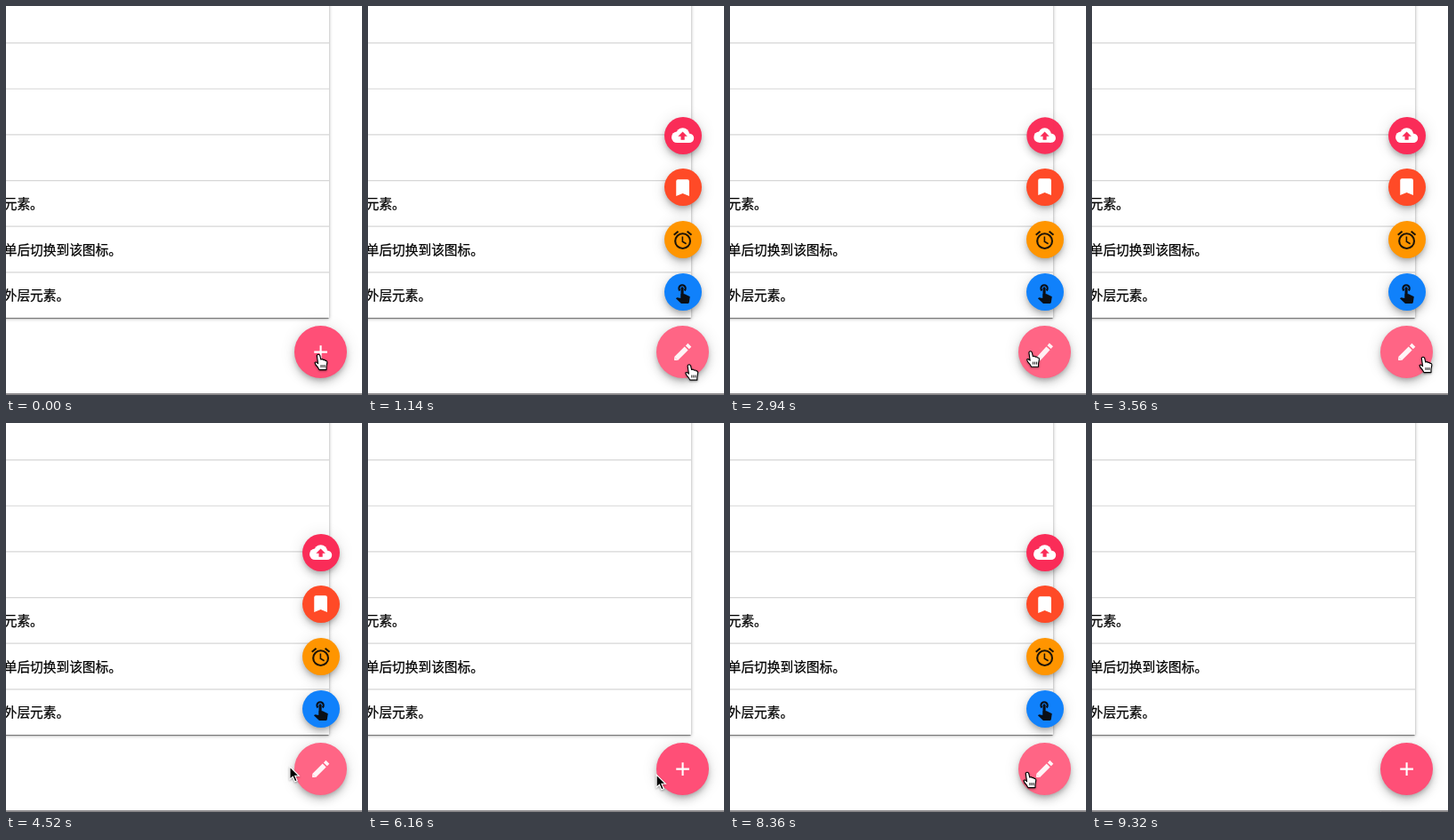
An HTML page that plays this animation: 400 px wide and 438 px high, repeating every 9340 ms.

```html
<!DOCTYPE html>
<html lang="zh-CN">
<head>
<meta charset="utf-8">
<style>
html, body { margin: 0; width: 100%; height: 100%; overflow: hidden; background: #fff; }
#stage { position: relative; width: 400px; height: 438px; overflow: hidden; background: #fff; }
#stage > * { position: absolute; }
#panel {
  left: -20px; top: -20px; width: 383px; height: 371px; background: #fff;
  box-shadow: 0 2px 1px -1px rgba(0,0,0,.3), 0 1px 1px rgba(0,0,0,.16), 0 1px 4px rgba(0,0,0,.32);
}
#rows { left: 0; top: 0; }
#rows line { stroke: #d6d6d6; stroke-width: 1.2; }
#rows text {
  font: 500 14.7px "Noto Sans CJK SC", "Noto Sans CJK", sans-serif;
  fill: #000; stroke: #000; stroke-width: .25;
}
.btn {
  border-radius: 50%;
  box-shadow: 0 3px 5px -1px rgba(0,0,0,.2), 0 6px 10px rgba(0,0,0,.14), 0 1px 18px rgba(0,0,0,.12);
}
.btn svg {
  position: absolute; left: 50%; top: 50%; width: 25.2px; height: 25.2px;
  margin: -12.6px 0 0 -12.6px;
}
.mini { left: 333px; width: 42px; height: 42px; }
#fab { left: 324px; top: 360px; width: 59px; height: 59px; }
#bar { left: 0; top: 436px; width: 400px; height: 2px; background: #8c8a8c; }
#cursor { left: 0; top: 0; overflow: visible; filter: drop-shadow(0 1px 1px rgba(0,0,0,.35)); }
</style>
</head>
<body>
<div id="stage">
  <div id="panel"></div>
  <svg id="rows" width="363" height="351"></svg>
  <div id="bar"></div>
  <div id="fab" class="btn"></div>
  <svg id="cursor" width="1" height="1">
    <path id="arrow" d="M0 0V14.2L3.3 11.2 5.7 16.8 8.2 15.7 5.8 10.3H10.3Z" stroke="#fff" stroke-width="1.1"/>
    <g id="hand" fill="#fff" stroke="#000" stroke-width="1.1" stroke-linejoin="round">
      <path d="M-1.7 1.4Q0-1 1.7 1.4L2.8 6Q5 5 5.5 6.6 7 6 8 7.4 10 7 9.8 9.6L9 14V17.6H1Q0 15-3 12L-4 9.5Q-3 8-.4 10.6Z"/>
      <path d="M3 12V15M5 12V15M7 12V15" stroke-width=".9"/>
    </g>
  </svg>
</div>
<script>
const LOOP = 9340;
const $ = id => document.getElementById(id);

// 24-unit icons in a main colour and a cut-out colour
const icons = {
  add: c => `<path d="M12 5v14M5 12h14" stroke="${c}" stroke-width="2"/>`,
  edit: c => `<path d="M4.9 19.1l11-11M17 7l2.4-2.4" stroke="${c}" stroke-width="5.3"/>
    <path d="M3 17.2V21h3.8z" fill="${c}"/>`,
  cloud: (c, cut) => `<g fill="${c}"><circle cx="12" cy="11" r="7"/><circle cx="6" cy="14" r="6"/>
    <circle cx="19" cy="15" r="5"/><path d="M6 11h13v9H6z"/></g>
    <path d="M10 17v-4H7l5-5 5 5h-3v4z" fill="${cut}"/>`,
  bookmark: c => `<path d="M5 21V5q0-2 2-2h10q2 0 2 2v16l-7-3z" fill="${c}"/>`,
  alarm: c => `<g fill="none" stroke="${c}" stroke-width="2"><circle cx="12" cy="13" r="8"/>
    <path d="M2.6 6.5l4.6-3.9M21.4 6.5l-4.6-3.9"/><path d="M11.8 8v5.6l4 2.4" stroke-width="1.5"/></g>`,
  touch: c => `<path d="M9 10a3.5 3.5 0 1 1 5 0" fill="none" stroke="${c}" stroke-width="2"/>
    <path d="M11.5 7.5V18" stroke="${c}" stroke-width="3" stroke-linecap="round"/>
    <path d="M10 13.5h4l5.8 3-1 6.5-1.4 1h-6.8l-5.9-5.7 1.3-1 4 .9z" fill="${c}"/>`
};
const icon = (name, color, cut) => `<svg viewBox="0 0 24 24">${icons[name](color, cut)}</svg>`;

const texts = ['', '', '', '元素。', '单后切换到该图标。', '外层元素。'];
$('rows').innerHTML = texts.map((text, i) => {
  const y = 41.6 + i * 51.65;
  return `<line x2="363" y1="${y}" y2="${y}"/><text x="-2.3" y="${y + 31.4}">${text}</text>`;
}).join('');

const minis = [
  ['cloud', '#fa2c58', '#fff'],
  ['bookmark', '#ff4a27', '#fff'],
  ['alarm', '#ff9500', '#1c1408'],
  ['touch', '#1081fb', '#0a0f16']
].map(([name, back, color], i) => {
  const el = document.createElement('div');
  el.className = 'btn mini';
  el.style.top = 124.5 + i * 58.9 + 'px';
  el.style.background = back;
  el.innerHTML = icon(name, color, back);
  $('stage').insertBefore(el, $('fab'));
  return el;
});

$('fab').innerHTML = icon('add', '#fff') + icon('edit', '#fff');
const [plus, pen] = $('fab').children;

// spans during which the menu is held open
const spans = [[0, 1850], [2700, 4545], [6180, 8450]];
const isOpen = t => spans.some(([a, b]) => t >= a && t < b);

// pointer turns and rests: time, x, y
const path = [
  [0, 351, 392], [300, 366, 413], [1600, 354, 394], [2020, 275, 377],
  [3560, 372, 395], [4520, 319, 387], [4900, 292, 386], [6000, 292, 386],
  [6160, 324, 396], [6500, 352, 400], [8000, 352, 400], [8360, 334, 393],
  [8640, 307, 393], [9140, 307, 393], [LOOP, 325, 440]
];

const slope = (i, c) => path[i] && path[i + 1]
  ? (path[i + 1][c] - path[i][c]) / (path[i + 1][0] - path[i][0]) : 0;

function tangent(i, c) {
  const a = slope(i - 1, c), b = slope(i, c);
  return a * b > 0 ? 2 * a * b / (a + b) : 0;
}

// monotone cubic through the path points
function along(t, c) {
  const i = path.findIndex(p => p[0] > t) - 1;
  const p = path[i], q = path[i + 1], d = q[0] - p[0], u = (t - p[0]) / d, v = 1 - u;
  return v * v * (1 + 2 * u) * p[c] + u * u * (1 + 2 * v) * q[c]
    + u * v * d * (v * tangent(i, c) - u * tangent(i + 1, c));
}

// cubic-bezier(.4, 0, .2, 1)
function ease(x) {
  if (x <= 0) return 0;
  if (x >= 1) return 1;
  let lo = 0, hi = 1;
  for (let n = 0; n < 20; n++) {
    const m = (lo + hi) / 2, w = 1 - m;
    if (1.2 * w * w * m + .6 * w * m * m + m * m * m < x) lo = m; else hi = m;
  }
  return lo * lo * (3 - 2 * lo);
}

// 0 closed, 1 open
function openness(t, duration, openDelay = 0, closeDelay = 0) {
  const [a, b] = spans.filter(s => s[0] <= t).pop();
  return t < b ? ease((t - a - openDelay) / duration)
    : 1 - ease((t - b - closeDelay) / duration);
}

function render(t) {
  minis.forEach((el, i) => {
    const k = openness(t, 200, 25 * (3 - i), 25 * i);
    el.style.transform = `scale(${k})`;
    el.style.opacity = k;
  });

  const turn = openness(t, 300), hover = openness(t, 150);
  plus.style.transform = `rotate(${135 * turn}deg)`;
  plus.style.opacity = 1 - turn;
  pen.style.transform = `rotate(${135 * (turn - 1)}deg)`;
  pen.style.opacity = turn * .93;
  $('fab').style.background = `rgb(255,${79 + 22 * hover},${119 + 14 * hover})`;

  const hand = isOpen(t) && isOpen(t + 50);
  $('hand').style.display = hand ? '' : 'none';
  $('arrow').style.display = hand ? 'none' : '';
  $('cursor').style.transform = `translate(${along(t, 1)}px,${along(t, 2)}px)`;
}

const start = performance.now();
function tick() {
  render((performance.now() - start) % LOOP);
  requestAnimationFrame(tick);
}
tick();
</script>
</body>
</html>
```
